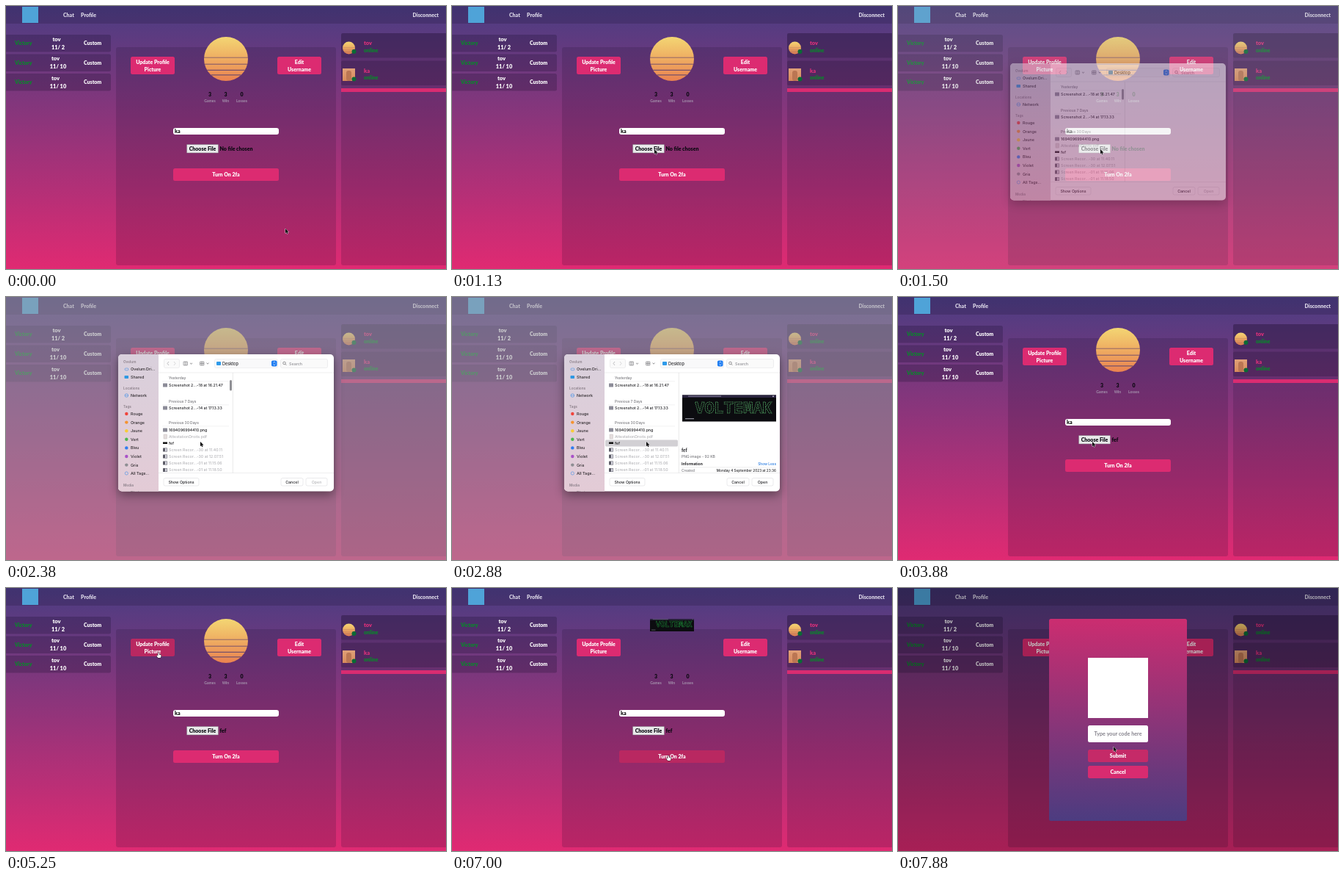
Animation, 600 px wide and 358 px high, one loop 8 s. Source, as an HTML page with a canvas:

```html
<!DOCTYPE html>
<html lang="en">
<head>
<meta charset="utf-8">
<title>Profile page</title>
<style>
html, body { margin: 0; width: 100%; height: 100%; overflow: hidden; background: #4a3b7f; }
canvas { display: block; width: 600px; height: 358px; }
</style>
</head>
<body>
<canvas id="stage"></canvas>
<script>
const W = 600, H = 358, LOOP = 8000, STEP = 125;
const PINK = '#dc2b71', GREEN = '#088a2a';
const PLAYER = 'tov', SELF = 'ka';
const dpr = window.devicePixelRatio || 1;

function surface(canvas) {
  canvas.width = W * dpr;
  canvas.height = H * dpr;
  return canvas.getContext('2d');
}
const main = surface(document.getElementById('stage'));
const layer = surface(document.createElement('canvas'));
let c = main;

const round = (size, weight = 900) => `${weight} ${size}px Lato, sans-serif`;
const ui = (size, weight = 500) => `${weight} ${size}px Inter, sans-serif`;

function box(x, y, w, h, fill, r = 0, stroke) {
  c.beginPath();
  c.roundRect(x, y, w, h, r);
  if (fill) { c.fillStyle = fill; c.fill(); }
  if (stroke) { c.strokeStyle = stroke; c.lineWidth = 0.5; c.stroke(); }
}
function dot(x, y, r, fill) {
  c.beginPath();
  c.arc(x, y, r, 0, 7);
  c.fillStyle = fill;
  c.fill();
}
function text(s, x, y, color, font, align = 'left') {
  c.font = font;
  c.fillStyle = color;
  c.textAlign = align;
  c.textBaseline = 'middle';
  c.fillText(s, x, y + 0.4);
}
function line(color, width, ...p) {
  c.beginPath();
  for (let i = 0; i < p.length; i += 2) c.lineTo(p[i], p[i + 1]);
  c.strokeStyle = color;
  c.lineWidth = width;
  c.stroke();
}
function fade(y0, y1, a, b) {
  const g = c.createLinearGradient(0, y0, 0, y1);
  g.addColorStop(0, a);
  g.addColorStop(1, b);
  return g;
}
function ramp(t, a, b) { return Math.min(1, Math.max(0, (t - a) / (b - a))); }
function ease(p) { return p * p * (3 - 2 * p); }

// Paint on the spare layer, then lay it over the stage as one sheet.
function group(alpha, dy, paint) {
  c = layer;
  c.setTransform(dpr, 0, 0, dpr, 0, 0);
  c.clearRect(0, 0, W, H);
  paint();
  c = main;
  c.globalAlpha = alpha;
  c.drawImage(layer.canvas, 0, dy, W, H);
  c.globalAlpha = 1;
}

// time, x, y of the pointer tip
const PATH = [
  [130, 381, 303], [1000, 276, 195], [1880, 276, 195], [2250, 265, 197],
  [4500, 265, 197], [5130, 208, 88], [5630, 208, 88], [6500, 295, 228],
  [7500, 295, 228], [7880, 294, 216]
];
function pointer(t) {
  let from = PATH[0];
  for (const to of PATH) {
    if (t < to[0]) {
      const p = ease(ramp(t, from[0], to[0]));
      return [from[1] + (to[1] - from[1]) * p, from[2] + (to[2] - from[2]) * p];
    }
    from = to;
  }
  return [from[1], from[2]];
}

function sun(x, y, r) {
  dot(x, y, r, fade(y - r, y + r, '#f3d673', '#ea8250'));
  for (const [k, w] of [[-0.06, 0.02], [0.24, 0.025], [0.51, 0.03], [0.73, 0.035]]) {
    const half = r * Math.sqrt(1 - k * k);
    line('#76506a', r * w * 1.3, x - half, y + r * k, x + half, y + r * k);
  }
}

function banner(x, y, w, glow) {
  c.save();
  c.translate(x, y);
  c.scale(w / 128, w / 128);
  box(0, 0, 128, 36, '#0c0c10');
  box(0, 0, 128, 3.5, '#2b2540');
  box(8, 1, 45, 1.3, '#77718d');
  dot(124, 1.8, 1, '#b9b4cc');
  c.font = '700 22px "Noto Sans Mono", monospace';
  c.textAlign = 'center';
  c.textBaseline = 'middle';
  c.setLineDash([1.4, 0.9]);
  c.lineWidth = 1;
  c.strokeStyle = glow;
  c.strokeText('VOLTEMAK', 70, 18);
  c.setLineDash([]);
  box(4, 31.5, 12, 1.2, '#8b8b96');
  c.restore();
}

function button(x, y, w, h, lines, mouse) {
  const over = mouse && mouse[0] >= x && mouse[0] <= x + w && mouse[1] >= y && mouse[1] <= y + h;
  box(x, y, w, h, over ? '#b92861' : PINK, 2.5);
  lines.forEach((s, i) =>
    text(s, x + w / 2, y + h / 2 + (i - (lines.length - 1) / 2) * 10, '#fff', round(7), 'center'));
  return over;
}

function page(t, mouse) {
  box(0, 0, W, H, fade(0, H, '#4b3d82', '#e02a72'));
  box(0, 0, W, 24, 'rgba(20,12,40,.2)');
  box(22, 1, 22, 22, '#4fa3d8');
  text('Chat', 78, 12, '#dcd8e8', round(7));
  text('Profile', 102, 12, '#dcd8e8', round(7));
  text('Disconnect', 590, 12, '#dcd8e8', round(7), 'right');

  [[39, 2], [65.5, 10], [92, 10]].forEach(([y, score], i) => {
    box(-3, y, 146, 23.5, 'rgba(20,12,40,.24)', 2.5);
    text('Victory', 12, y + 11.5, GREEN, round(7));
    text(PLAYER, i ? 67.5 : 69, y + 6, '#fff', round(7.6), 'center');
    text('11/ ' + score, 71, y + 17, '#fff', round(7.4), 'center');
    text('Custom', 106, y + 11.5, '#fff', round(7));
  });

  box(150, 56, 300, 297, 'rgba(30,12,45,.18)', 3);
  box(457, 37, 146, 316, 'rgba(30,12,45,.18)', 3);
  [[37, PLAYER], [74.5, SELF]].forEach(([y, name], i) => {
    box(457, y, 146, 33.5, 'rgba(20,12,40,.22)', 2);
    if (i) {
      box(459, 85, 17, 17, fade(85, 102, '#e0a078', '#d98b5c'));
      box(464, 88, 7, 14, '#bb7653', 3);
    } else sun(467.5, 57, 8.5);
    dot(474.5, y + 25, 3, '#0a6a35');
    text(name, 488, y + 13.5, '#e0307a', round(7.5));
    text('online', 488, y + 23, GREEN, round(7));
  });
  box(457, 112, 143, 5, '#d92c71');

  let hand = button(170, 69, 60, 24, ['Update Profile', 'Picture'], mouse);
  hand = button(370, 69, 60, 24, ['Edit', 'Username'], mouse) || hand;
  if (t < 5880) sun(300, 72, 30);
  else banner(270, 42, 60, '#25cf4c');

  [['3', 'Games', 278], ['3', 'Win', 299.5], ['0', 'Losses', 321.5]].forEach(([n, label, x]) => {
    text(n, x, 120, '#0a0810', round(7), 'center');
    text(label, x, 129, '#a593ad', round(5.1, 700), 'center');
  });

  box(228, 166, 144, 9, '#fff', 3);
  text(SELF, 230, 170.5, '#111', round(7));
  box(246.5, 188.5, 43, 11.5, '#e9e9ea', 0.5, '#77727a');
  text('Choose File', 268, 194.2, '#0a0810', round(7), 'center');
  text(t < 3500 ? 'No file chosen' : 'fef', 291.5, 194.2, '#0a0810', round(7));
  hand = button(228, 221, 144, 17, ['Turn On 2fa'], mouse) || hand;
  return hand;
}

const TAGS = [['Rouge', '#f0443c'], ['Orange', '#f59331'], ['Jaune', '#f7cb3a'], ['Vert', '#4bb64f'],
  ['Bleu', '#2f7cf0'], ['Violet', '#a952c8'], ['Gris', '#8e8e93']];
const FILES = [[120, 'Screenshot 2...-18 at 16.21.47', 1], [151, 'Screenshot 2...-14 at 17.13.33', 1],
  [181, '1694096994410.png', 1], [190, 'AttestationDroits.pdf', 0], [199, 'fef', 1],
  [208, 'Screen Recor...-30 at 11.40.11', 0], [217, 'Screen Recor...-30 at 12.07.51', 0],
  [226, 'Screen Recor...-01 at 11.15.06', 0], [235.5, 'Screen Recor...-01 at 11.18.50', 0]];

function sidebar() {
  box(153, 78, 55, 187, fade(78, 265, '#d9d0dc', '#e3cbd6'));
  const head = (s, y) => text(s, 160, y, '#8d818b', ui(4.7, 600));
  const item = (s, y) => text(s, 170, y, '#2d282c', ui(5.4));
  head('Ovelum', 88);
  item('Ovelum Dri...', 98);
  item('Shared', 109);
  head('Locations', 124);
  item('Network', 134);
  head('Tags', 149);
  head('Media', 256);
  item('Photos', 265.5);
  box(162, 97, 5, 2.8, null, 1.4, '#2784e8');
  box(161.5, 107, 5.5, 4, '#2e98e2', 0.8);
  c.beginPath();
  c.arc(164.3, 134, 2.3, 0, 7);
  c.moveTo(162, 134);
  c.lineTo(166.6, 134);
  c.strokeStyle = '#2784e8';
  c.stroke();
  TAGS.forEach(([name, color], i) => {
    dot(164.3, 159 + i * 11.6, 2.2, color);
    item(name, 159 + i * 11.6);
  });
  c.beginPath();
  c.arc(164.3, 240, 2.1, 0, 7);
  c.stroke();
  item('All Tags...', 240);
}

function toolbar() {
  const dark = '#55555a';
  box(215.5, 84.5, 21, 12, '#fafafa', 2, '#dedee0');
  line('#a5a5aa', 0.7, 222, 88, 220, 90.5, 222, 93);
  line('#c8c8cc', 0.7, 229, 88, 231, 90.5, 229, 93);
  for (const x of [242, 264.5]) {
    box(x, 88, 5.5, 5, null, 0.5, dark);
    line(dark, 0.5, x + 1.9, 88, x + 1.9, 93);
    line(dark, 0.5, x + 3.7, 88, x + 3.7, 93);
    if (x > 250) line(dark, 0.5, x, 90.5, x + 5.5, 90.5);
    line(dark, 0.7, x + 9, 89.8, x + 10.5, 91.2, x + 12, 89.8);
  }
  box(284.5, 84.5, 86, 12, '#f9f9fa', 2, '#e2e2e5');
  box(287, 88, 6, 5, '#2f9bea', 1);
  text('Desktop', 295, 90.5, '#29292c', ui(5.5));
  box(362, 86.5, 7.5, 8, '#1d7cf2', 1.8);
  line('#fff', 0.7, 364.3, 89.6, 365.8, 88.2, 367.3, 89.6);
  line('#fff', 0.7, 364.3, 91.4, 365.8, 92.8, 367.3, 91.4);
  box(374.5, 84.5, 64, 12, '#fafafa', 2, '#dedee0');
  c.beginPath();
  c.arc(379.5, 90, 1.8, 0, 7);
  c.strokeStyle = dark;
  c.lineWidth = 0.6;
  c.stroke();
  line(dark, 0.7, 380.8, 91.3, 382.3, 92.8);
  text('Search', 386, 90.5, '#909095', ui(5.4));
}

function dialog(picked) {
  c.save();
  c.shadowColor = 'rgba(0,0,0,.4)';
  c.shadowBlur = 14 * dpr;
  c.shadowOffsetY = 5 * dpr;
  box(153, 78, 294, 186.5, '#fff', 5);
  c.restore();
  c.save();
  c.beginPath();
  c.roundRect(153, 78, 294, 186.5, 5);
  c.clip();
  sidebar();
  toolbar();
  line('#e2e2e4', 0.6, 208, 103, 447, 103);
  line('#e2e2e4', 0.6, 208, 239.5, 447, 239.5);
  line('#d8d8da', 0.6, 309.3, 103, 309.3, 239.5);
  [['Yesterday', 110], ['Previous 7 Days', 142], ['Previous 30 Days', 171]].forEach(([s, y]) => {
    text(s, 222, y, '#77777c', ui(4.9));
    line('#e6e6e8', 0.5, 213, y + 4.8, 304, y + 4.8);
  });
  if (picked) box(209, 194.5, 99, 9, '#d2d0d4', 1.5);
  for (const [y, name, on] of FILES) {
    const film = name.startsWith('Screen R');
    if (name === 'fef') box(214, y - 1.4, 6, 2.4, '#111');
    else if (!on && !film) box(215, y - 3, 4.5, 6, '#e4dede', 0.4, '#c5bcbc');
    else box(214, y - 2.5, 6, 5, film ? '#5d5d68' : '#8c8c98', 0.5);
    if (film) box(217, y - 2, 2.4, 4, '#d9d9e2');
    text(name, 222, y, on ? '#202024' : '#b3b3b7', ui(5.25));
  }
  if (!picked) box(305, 113, 3, 14.5, '#8f8f94', 1.5);
  if (picked) {
    banner(314, 133.5, 128, '#4c9a5c');
    text('fef', 313, 208.5, '#242428', ui(5.6, 700));
    text('PNG image - 92 KB', 313, 217, '#77777c', ui(5));
    text('Information', 313, 227, '#242428', ui(5.1, 700));
    text('Show Less', 442, 227, '#2479e0', ui(4.8), 'right');
    line('#dcdcdf', 0.5, 313, 231.8, 442, 231.8);
    text('Created', 313, 236.5, '#77777c', ui(4.7));
    text('Monday 4 September 2023 at 23:36', 442, 236.5, '#242428', ui(4.7), 'right');
  }
  for (const [s, x, w, on] of [['Show Options', 215, 48, 1], ['Cancel', 375, 30, 1], ['Open', 409, 29, picked]]) {
    box(x, 246.5, w, 10.5, '#fff', 2, '#d4d4d8');
    text(s, x + w / 2, 251.7, on ? '#222226' : '#b5b5b9', ui(5.3), 'center');
  }
  c.restore();
}

function modal() {
  box(0, 0, W, H, 'rgba(0,0,0,.25)');
  box(206, 42, 188, 275, fade(42, 317, '#cb2d70', '#4c3c80'), 2.5);
  box(259, 95, 82, 82, '#fff');
  box(259, 187, 82, 23, '#fff', 2.5);
  text('Type your code here', 300, 198.5, '#85828c', round(7.2, 700), 'center');
  box(259, 220, 82, 17, '#c52a68', 2.5);
  text('Submit', 300, 228.5, '#fff', round(7), 'center');
  box(259, 242, 82, 17, '#d82b70', 2.5);
  text('Cancel', 300, 250.5, '#fff', round(7), 'center');
}

function shape(x, y, points, fill, edge) {
  c.beginPath();
  for (let i = 0; i < points.length; i += 2) c.lineTo(x + points[i], y + points[i + 1]);
  c.closePath();
  c.lineJoin = 'round';
  c.strokeStyle = edge;
  c.lineWidth = 0.9;
  c.stroke();
  c.fillStyle = fill;
  c.fill();
}
const ARROW = [0, 0, 0, 6.3, 1.4, 5, 2.4, 7.2, 3.4, 6.8, 2.4, 4.7, 4.4, 4.6];
const HAND = [-0.6, 0, 0.6, 0, 0.8, 2.4, 3.4, 3, 3.4, 5.4, 2.5, 7, -0.8, 7, -2.6, 4.2, -1.8, 3.6, -0.7, 4.4];

function draw(t) {
  c.setTransform(dpr, 0, 0, dpr, 0, 0);
  c.globalAlpha = 1;
  const [x, y] = pointer(t);
  const leaving = ramp(t, 3110, 3480);
  const shown = ramp(t, 1380, 1630) * (1 - leaving);
  const overlay = ramp(t, 7380, 7750);
  const hand = page(t, shown || overlay ? null : [x, y]);
  if (shown) {
    c.globalAlpha = 0.52 * shown ** 1.4;
    box(0, 0, W, H, '#a0a0a5');
    group(shown, -14 * leaving, () => dialog(t >= 2630));
  }
  if (overlay) group(overlay, 0, modal);
  if (hand) shape(x, y, HAND, '#fff', '#111');
  else shape(x, y, ARROW, '#0a0a0a', '#e9e9ee');
}

const start = performance.now();
function tick(now) {
  const t = Math.max(0, now - start) % LOOP;
  draw(Math.floor((t + 1) / STEP) * STEP + 5);
  requestAnimationFrame(tick);
}
draw(0);
requestAnimationFrame(tick);
</script>
</body>
</html>
```
